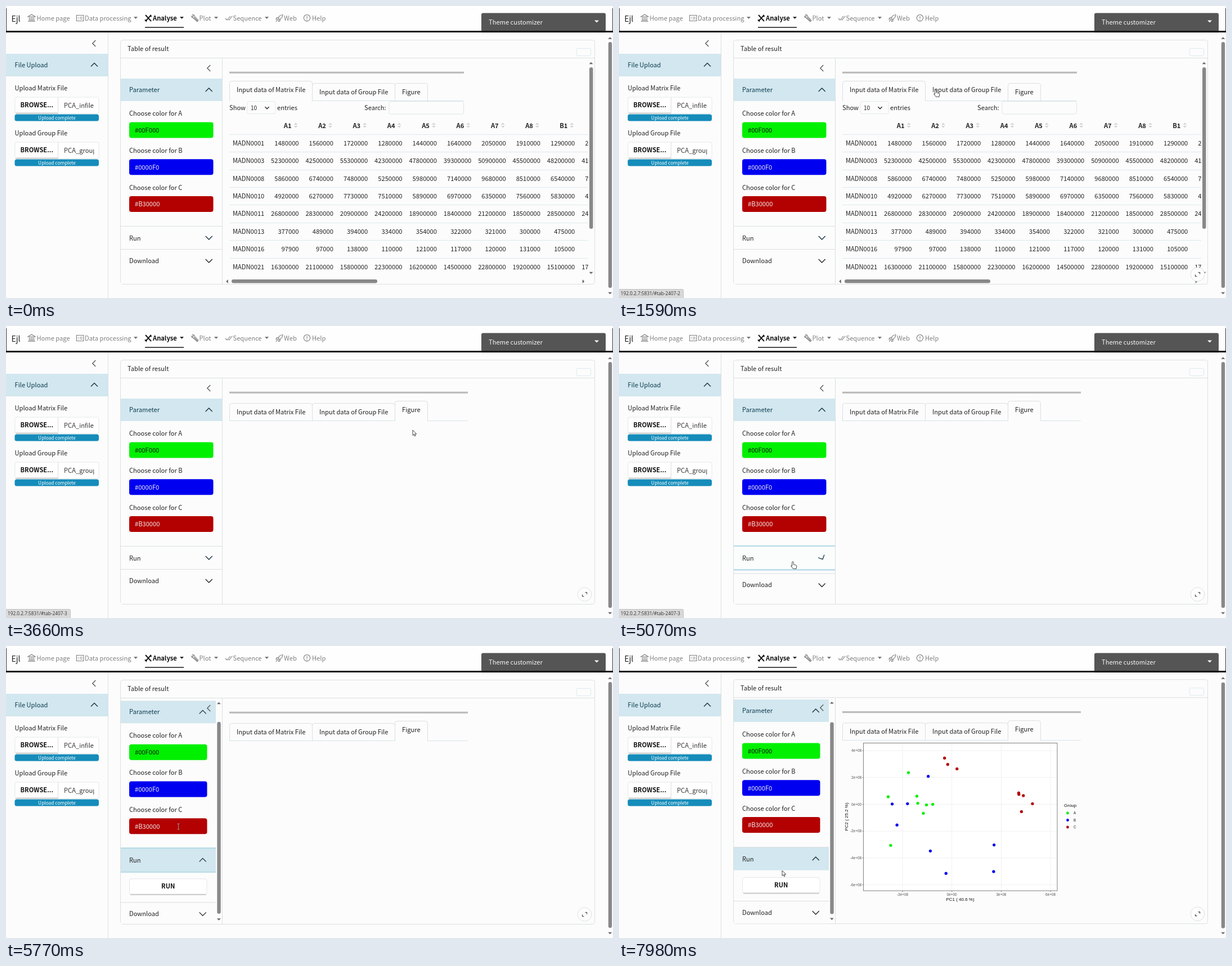
Write an HTML page that moves like this. It is 1079 px wide and 519 px high and loops after 8 s.

```html
<!DOCTYPE html>
<html lang="en">
<head>
<meta charset="utf-8">
<style>
  html, body { margin: 0; width: 100%; height: 100%; overflow: hidden; background: #fcfcfc; }
  svg { display: block; width: 1079px; height: 519px; white-space: pre;
        font-family: "Noto Sans CJK SC", "Noto Sans CJK JP", "Noto Sans", sans-serif; }
  .b { font-weight: 700; }
  .m { text-anchor: middle; }
  .e { text-anchor: end; }
  .plot { font-family: "Liberation Sans", Arial, sans-serif; }
  .status { font-family: "Open Sans", "Noto Sans", sans-serif; }
</style>
</head>
<body>
<svg viewBox="0 0 1079 519">
  <defs>
    <clipPath id="cells"><rect x="397" y="195" width="638" height="285"/></clipPath>
    <clipPath id="card"><rect x="204" y="92" width="842" height="402"/></clipPath>
    <clipPath id="file"><rect x="93" y="160" width="63.5" height="120"/></clipPath>
  </defs>
  <g id="page"></g>
  <g id="live"></g>
</svg>
<script>
const LOOP = 8000, INK = '#222', DARK = '#12303c', BAR = '#d2e7ef', EDGE = '#dcdfe0', BG = '#fcfcfc', THUMB = '#888';

// Drawing helpers; text is placed by its vertical centre.
const text = (x, y, s, fill = INK, cls = '', size = 11.15) =>
  `<text x="${x}" y="${y + size * .36}" fill="${fill}" font-size="${size}" class="${cls}">${s}</text>`;
const rect = (x, y, w, h, fill, r = 0, stroke = 'none') =>
  `<rect x="${x}" y="${y}" width="${w}" height="${h}" rx="${r}" fill="${fill}" stroke="${stroke}"/>`;
const path = (d, stroke, width = 1, fill = 'none') =>
  `<path d="${d}" stroke="${stroke}" stroke-width="${width}" fill="${fill}"/>`;
const dot = (x, y, r, fill, stroke = 'none') =>
  `<circle cx="${x}" cy="${y}" r="${r}" fill="${fill}" stroke="${stroke}"/>`;
const group = (body, attrs) => `<g ${attrs}>${body}</g>`;
const shift = (body, x, y, turn = 0) =>
  group(body, `transform="translate(${x} ${y}) rotate(${turn})"`);
const hLine = (x1, x2, y, color = EDGE, w = 1) => path(`M${x1} ${y}H${x2}`, color, w);
const chevron = (x, y, turn = 0, color = INK, s = 6) =>
  shift(path(`M${-s} ${-s / 2}L0 ${s / 2}L${s} ${-s / 2}`, color, 1.3), x, y, turn);
const caret = (x, y, color, turn = 0, s = 3.5) =>
  shift(path(`M${-s} ${-s / 2}H${s}L0 ${s / 2}Z`, 'none', 0, color), x, y, turn);
const scrollBar = (x, top, bottom, y, h) =>
  caret(x, top, '#666', 180) + caret(x, bottom, '#666') + rect(x - 3, y, 6.4, h, THUMB, 3.2);
const repeat = (n, draw) => Array.from({ length: n }, (_, i) => draw(i)).join('');

const ramp = (t, a, b) => Math.min(1, Math.max(0, (t - a) / (b - a)));
const smooth = p => p * p * (3 - 2 * p);
function seeded(seed) {
  return () => {
    const v = Math.sin(++seed * 12.9898) * 43758.5453;
    return v - Math.floor(v);
  };
}

// ---- Fixed page parts ----
// Each menu entry: icon x, label x, label, caret x, icon outline.
const menu = [
  [39, 54.5, 'Home page', 0, 'M0 4L6.5 0 13 4ZM0 12.5H13M1 10.5H12M2.5 5v5m2.7-5v5m2.6-5v5m2.7-5v5'],
  [125.5, 140, 'Data processing', 230.5, 'M0 1.5H12.5V11.5H0ZM2.5 5H4m1.5 0h5M2.5 8H4m1.5 0h5'],
  [247, 261, 'Analyse', 312.5, 'M1 1L11 12M11 1L1 12M9 1.5l2.5 2.5M0 9.5l3 3'],
  [329.5, 343.5, 'Plot', 373.5, 'M4.5 5L11 11.5M3 6l7 6.5q2.5 0 2-2.5L6 4Q6 0 2 .5l1.8 2L2.5 4.2.4 3Q.3 5.5 3 6'],
  [390, 403.5, 'Sequence', 463.5, 'M0 7l3 3 6-7M5.5 9l1 1 6-7.5'],
  [480, 494, 'Web', 0, 'M4 8Q5 1 12 .5 11.5 7 5 9ZM4.5 5L1 6 0 8.5l3-.5M7.5 8L7 11.5l-2.5 1L5 9.5M0 12.5l3-3'],
  [529, 544, 'Help', 0, 'M6 .5A5.7 5.7 0 1 1 5.9.5M6 3v4.5m0 1.2V10'],
];
function navBar() {
  const entries = menu.map(([iconX, x, label, caretX, icon]) => {
    const on = label === 'Analyse', color = on ? '#111' : '#808080';
    return shift(path(icon, color, on ? 1.9 : 1.1), iconX, 15) + text(x, 21.5, label, color, on ? 'b' : '') +
      (caretX ? caret(caretX, 21, on ? '#111' : '#666') : '');
  }).join('');
  return rect(0, 0, 1079, 45, '#fefefe') + path('M.5 4V45M1078.5 4V45', '#333') +
    text(9.5, 22.5, 'Ejl', INK, '', 14) + entries + hLine(247, 316, 38, '#111', 1.6) +
    rect(845, 45, 221, 4.5, '#e8e8e8', 2) + rect(845, 12.5, 221, 33, '#555', 3) +
    rect(0, 44, 1079, 3, '#161616') +
    text(858, 28.5, 'Theme customizer', '#f4f4f4') + caret(1050, 27.5, '#fff', 0, 4);
}

function upload(y, label, file) {
  return text(15.5, y, label) + rect(16, y + 16, 149, 29, '#fff', 3, '#e4e8ea') +
    hLine(17, 92, y + 44.5, '#ccc', 2) + path(`M92.5 ${y + 16}V${y + 45}`, '#ddd') +
    text(25.5, y + 30, 'BROWSE...', '#111', 'b') +
    group(text(103, y + 31, file, '#333'), 'clip-path="url(#file)"') +
    rect(15.5, y + 46.5, 149.5, 12, '#158cba', 3.5) +
    text(90.5, y + 52.5, 'Upload complete', '#fff', 'm', 8.35);
}

const sideBar = path('M181.5 47V519', EDGE) + chevron(156.5, 66.5, 90, '#555', 5.5) +
  rect(0, 85, 181, 40, BAR) + text(15.5, 105, 'File Upload', '#0d3c50') + chevron(157, 104.5, 180, DARK) +
  upload(146, 'Upload Matrix File', 'PCA_infile') + upload(226, 'Upload Group File', 'PCA_groups');

const cardFrame = rect(203.5, 60.5, 843, 434, BG, 4, EDGE) + hLine(204, 1046, 92.5) +
  text(216, 76, 'Table of result') + path('M384.5 93V494', EDGE) +
  rect(1014.5, 75.5, 25, 13, 'none', 2, '#dceaee');

// ---- Tables ----
const samples = ['A1', 'A2', 'A3', 'A4', 'A5', 'A6', 'A7', 'A8', 'B1'];
const colRight = i => 520.5 + 61.35 * i;
const rowY = i => 244 + 31.37 * i;
const sortMark = (x, c) => caret(x, 209.3, c, 180) + caret(x, 214.7, c);
const rowLines = (right, n, c) => repeat(n, i => hLine(397, right, Math.round(rowY(i) - 16) + .5, c));
const tableTop = text(397, 180.5, 'Show') + rect(429, 169.5, 50, 22, BG, 3, '#e3eaec') +
  text(435, 181, '10', INK, '', 10) + chevron(464, 181, 0, INK, 3.6) + text(482, 180.5, 'entries') +
  text(637, 180.5, 'Search:') + rect(681, 169.5, 132.5, 22.5, BG, 3, '#dde6e9');

// Every row scatters around its own typical value, kept to three digits.
const typical = { '0001': 16e5, '0003': 44e6, '0008': 75e5, '0010': 6e6,
  '0011': 24e6, '0013': 4e5, '0016': 13e4, '0021': 2e7 };
function matrixTable() {
  const random = seeded(3);
  const value = mean => Number((mean * (.7 + .6 * random())).toPrecision(3));
  const heads = samples.map((s, i) =>
    text(colRight(i) - 13, 212.5, s, INK, 'b e') + sortMark(colRight(i) - 5.5, '#d0d4d6')).join('');
  const rows = Object.entries(typical).sort().map(([id, mean], r) => text(403, rowY(r), 'MADN' + id) +
    repeat(10, i => text(colRight(i), rowY(r), value(mean), INK, 'e'))).join('');
  return tableTop + group(heads + rowLines(1035, 8, '#dde9ed') + rows, 'clip-path="url(#cells)"') +
    scrollBar(1040, 101.5, 474.5, 109, 287) +
    caret(393, 489.5, '#666', 90) + caret(1026.5, 489.5, '#666', -90) + rect(401, 486, 259, 6.6, THUMB, 3.3);
}
const groupTable = () => tableTop +
  text(472, 212.5, 'Sample', INK, 'b') + text(656, 212.5, 'Group', INK, 'b') +
  sortMark(638.5, '#c4c4c4') + sortMark(802, '#c4c4c4') + rowLines(814, 9, '#d9dee0') +
  samples.map((s, i) => text(403, rowY(i), i + 1) + text(472, rowY(i), s) + text(656, rowY(i), s[0])).join('') +
  scrollBar(1040, 101.5, 486, 109, 304);

// ---- Scatter plot ----
const groups = { A: '#00F000', B: '#0000F0', C: '#B30000' };
function scatterPlot() {
  const random = seeded(11);
  const cloud = (name, n, x, y, rx, ry) => repeat(n, () =>
    dot(x + rx * (2 * random() - 1), y + ry * (2 * random() - 1), 2.6, groups[name]));
  const power = k => k + 'e+0' + (k ? 8 : 0);
  const columns = repeat(4, i => {
    const x = 504 + 87.7 * i;
    return path(`M${x} 173V435`, '#f0f0f0') + path(`M${x} 435v2`, '#777') +
      text(x, 441.5, power(3 * i - 3), '#555', 'm', 6.4);
  });
  const rows = repeat(6, i => {
    const y = 186 + 47.7 * i;
    return hLine(435, 779, y, '#f0f0f0') + hLine(432.5, 434.5, y, '#777') +
      text(431, y, power(4 - 2 * i), '#555', 'e', 6.4);
  });
  const legend = Object.entries(groups).map(([name, color], i) =>
    dot(797.5, 297 + 12.5 * i, 2.4, color) + text(808, 297 + 12.5 * i, name, INK, '', 6.4)).join('');
  return group(rect(434.5, 172.5, 344.5, 262.5, '#fff') + columns + rows +
    rect(434.5, 172.5, 344.5, 262.5, 'none', 0, '#808080') +
    cloud('A', 8, 515, 290, 50, 65) + cloud('B', 8, 560, 300, 110, 120) +
    cloud('C', 3, 593, 210, 20, 14) + cloud('C', 5, 720, 278, 24, 22) +
    text(606.5, 449.8, 'PC1 ( 40.6 %)', '#111', 'm', 8) +
    shift(text(0, 0, 'PC2 ( 25.2 %)', '#111', 'm', 8), 404, 303.5, -90) +
    text(791, 283, 'Group', '#111', '', 8) + legend, 'class="plot" transform="translate(0 .8)"');
}
const contents = [matrixTable(), groupTable(), scatterPlot()];

// ---- Changing parts ----
const tabList = [[397, 544, 'Input data of Matrix File'], [544, 691, 'Input data of Group File'], [691, 749, 'Figure']];
function tabs(active, lift) {
  const right = active === 2 ? 821 : 814;
  return rect(397, 116.7, right - 397, 3.2, '#bbb') + hLine(397, right, 168.5, '#d9e5e9') +
    tabList.map(([a, b, label], i) => {
      const on = i === active, up = on ? 1 : lift[i], top = on ? 133.5 : 137.5;
      const outline = `M${a + .5} 169V${top + 4}q0-4 4-4H${b - 3.5}q4 0 4 4V169`;
      return path(outline, up && !on ? 'none' : EDGE, 1, on ? BG : 'none') + text(a + 13, 153 - 4.5 * up, label);
    }).join('');
}

function parameters(open, scroll, focus, pressed) {
  const overflow = open > .38, edge = overflow ? 373 : 384, arrowX = edge - 23.3, grow = 55 * open;
  const width = edge - 234.5, push = pressed ? 1 : 0;
  const swatches = Object.entries(groups).map(([name, color], i) =>
    text(219, 191 + 65.9 * i, 'Choose color for ' + name) + rect(219, 206.4 + 65.8 * i, width, 28, color, 4) +
    text(229, 220.8 + 65.8 * i, color, i ? '#eee' : '#111')).join('');
  const button = rect(219.5, 445.5 + push, width - 1, 28 - push, '#fff', 4, '#e6e6e6') +
    hLine(221, 217 + width, 473.5, '#c8c8c8', 2 - push) + text(219 + width / 2, 458.5 + push, 'RUN', '#111', 'b m');
  const body = rect(204, 129, edge - 204, 40, BAR) + text(219, 149, 'Parameter', '#0d3c50') +
    chevron(arrowX, 149, 180, DARK) + swatches + hLine(204, edge, 391.5) + (open ? button : '') +
    rect(204, 432.5 + grow, edge - 204, 62, BG) +
    group(rect(204, 392, edge - 204, 40.5, BAR), `opacity="${open * open}"`) +
    (focus ? hLine(204, edge, 391, '#bcdde8', 2.6) + hLine(204, edge, 433.4, '#bcdde8', 2.6) : '') +
    text(219, 412.5, 'Run') + chevron(arrowX, 412, -180 * open, DARK) +
    hLine(204, edge, 432.5 + grow) + text(219, 453 + grow, 'Download') + chevron(arrowX, 453 + grow);
  return group(shift(body, 0, -scroll), 'clip-path="url(#card)"') + chevron(360.5, 110.5, 90, '#555', 5.5) +
    (overflow ? scrollBar(378.3, 101.5, 486, 107 + scroll * .88, 341) : '');
}

const expandButton = dot(1028.5, 477, 12.3, '#fdfdfd', '#dde0e1') +
  path('M1029.5 473.5h3v3M1024.5 477.5v3h3', '#444', 1.2);

// ---- Pointer ----
// Each move: start, end, target.
const moves = [[280, 1070, 357, 165], [1120, 1590, 563, 149], [2020, 2490, 702, 154], [3060, 3660, 723, 185],
  [3800, 4640, 309, 419], [5120, 5770, 306.5, 321], [5810, 6280, 288, 421], [6990, 7790, 290, 399]];
const shapes = {
  arrow: path('M0 0V9.5L2.2 7.5 3.6 10.7 5.1 10 3.7 6.9H6.7Z', '#333', .9, '#fff'),
  hand: path('M-1.3 1.2a1.3 1.3 0 0 1 2.6 0V5l4.4 1.1q1.4.5 1.1 2L6 12.4H.4L-3 7.8q-.6-1.4.8-1l.9.7Z', '#333', .9, '#fff'),
  beam: path('M-2-5H2M0-5V5M-2 5H2', '#8a9aa0'),
};
function pointer(t, scroll) {
  if (t < moves[0][0]) return '';
  let x = 715, y = -12;
  for (const [start, end, toX, toY] of moves) {
    const p = smooth(ramp(t, start, end));
    x += (toX - x) * p;
    y += (toY - y) * p;
  }
  const inside = (left, right, top, bottom) => x > left && x < right && y > top && y < bottom;
  const panelY = y + scroll, inPanel = inside(204, 373, 92, 494);
  const overLink = inside(397, 749, 137, 169) ||
    inPanel && (panelY > 392 && panelY < 432 || panelY > 445 && panelY < 475);
  const overSwatch = inPanel && panelY > 206 && panelY < 366 && (panelY - 206.4) % 65.8 < 28;
  return shift(shapes[overLink ? 'hand' : overSwatch ? 'beam' : 'arrow'], x, y);
}

function scene(t) {
  const active = t < 1720 ? 0 : t < 2980 ? 1 : 2;
  const lift = [0, active ? 0 : ramp(t, 1400, 1520), ramp(t, 2420, 2540)];
  const open = smooth(ramp(t, 4990, 5340));
  const scroll = 33.2 * (1 - (1 - ramp(t, 5480, 5900)) ** 2.6);
  const drift = .8 * ramp(t, 7840, 7960);
  const content = active < 2 || t > 7150 ? contents[active] : '';
  const card = cardFrame + tabs(active, lift) + group(content, 'clip-path="url(#card)"') +
    parameters(open, scroll, t > 4980 && t < 6570, t > 6570 && t < 6700) + (t > 600 ? expandButton : '');
  const status = t > 1430 && t < 5300
    ? rect(-1, 503.5, 115.5, 17, '#d8d8d8', 2, '#c4c4c4') +
      text(3, 511.5, '192.0.2.7:5831/#tab-2407-' + (t < 2430 ? 2 : 3), '#333', 'status', 8.25) : '';
  return shift(card, 0, -drift) + scrollBar(1073.7, 57, 510.5, 64 + drift, 437) + status + pointer(t, scroll);
}

document.getElementById('page').innerHTML = navBar() + sideBar;
const live = document.getElementById('live');
let last = '';
function tick() {
  const html = scene(performance.now() % LOOP);
  if (html !== last) live.innerHTML = last = html;
  requestAnimationFrame(tick);
}
tick();
</script>
</body>
</html>
```
